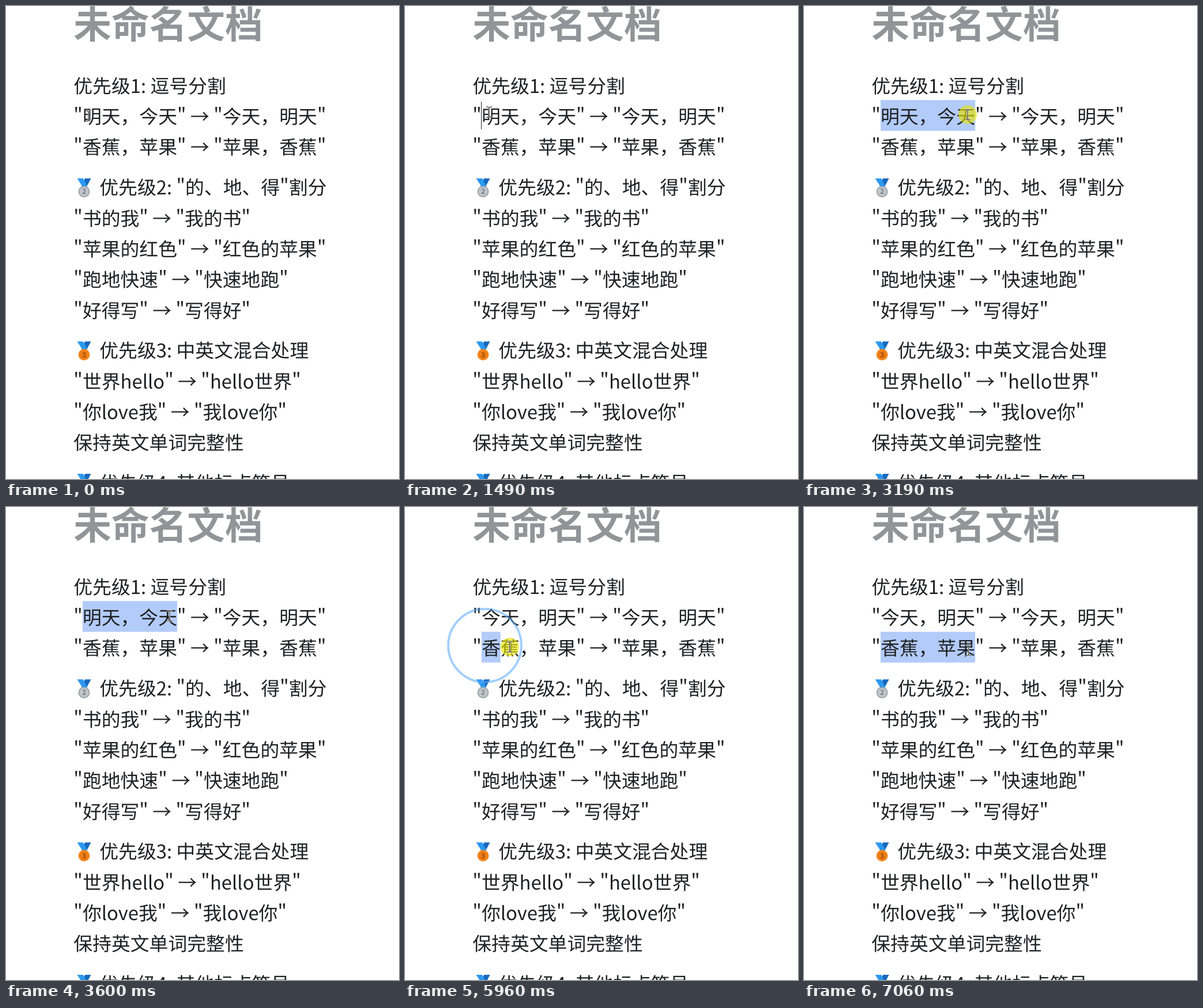
An HTML page that plays this animation: 682 by 821 pixels, repeating every 8000 ms.

```html
<!DOCTYPE html>
<html lang="zh-CN">
<head>
<meta charset="utf-8">
<style>
  html, body { margin: 0; width: 100%; height: 100%; overflow: hidden; background: #fff; }
  svg { display: block; }
  text {
    font: 32.85px "Noto Sans CJK SC", "Noto Sans CJK", "Noto Sans CJK JP", sans-serif;
    fill: #1f2022; white-space: pre; text-rendering: geometricPrecision;
  }
  .title { font-size: 65.7px; font-weight: 700; fill: #929498; }
  .digit { font-size: 12px; font-weight: 700; text-anchor: middle; }
</style>
</head>
<body>
<svg width="682" height="821" viewBox="0 0 682 821">
  <rect id="selection" height="53.4" fill="#b2cbf9"/>
  <text class="title" x="117.3" y="56">未命名文档</text>
  <g id="doc"></g>
  <rect id="caret" width="1" height="48" fill="#1f2022"/>
  <circle id="ring" fill="none" stroke="#58aafa" stroke-width="4"/>
  <g id="pointer" fill="none">
    <circle id="dot" r="16" fill="#e8e400" fill-opacity=".64"/>
    <path id="beam" d="M-5 -9h3l2 2l2 -2h3M0 -7V7M-5 9h3l2 -2l2 2h3"/>
    <use href="#beam" stroke="#fff" stroke-width="3" stroke-opacity=".7"/>
    <use href="#beam" stroke="#333" stroke-width="1.2"/>
  </g>
</svg>
<script>
const LOOP = 8000, STEP = 70, BLINK = 508, SWAP = 4730;
const LEFT = 117.3, EM = 32.85, ROW = 53.35, GAP = 16.4, FIRST_BASELINE = 150.7;
const TEXT_LEFT = LEFT + 0.474 * EM; // after the opening quote
const SELECTED_MAX = 5;

const $ = id => document.getElementById(id);
const set = (el, attrs) => { for (const k in attrs) el.setAttribute(k, attrs[k]); };
const show = (el, on) => set(el, { visibility: on ? 'visible' : 'hidden' });
const clamp = (v, lo, hi) => Math.min(hi, Math.max(lo, v));

const groups = [
  ['优先级1: 逗号分割', '"明天，今天" → "今天，明天"', '"香蕉，苹果" → "苹果，香蕉"'],
  ['优先级2: "的、地、得"割分', '"书的我" → "我的书"', '"苹果的红色" → "红色的苹果"', '"跑地快速" → "快速地跑"', '"好得写" → "写得好"'],
  ['优先级3: 中英文混合处理', '"世界hello" → "hello世界"', '"你love我" → "我love你"', '保持英文单词完整性'],
  ['优先级4: 其他标点符号']
];
const silver = { rim: '#9ea7ad', face: '#c0c6ca', ink: '#737c82' };
const bronze = { rim: '#f58a1e', face: '#ee7d16', ink: '#a04c08' };

const medal = (digit, y, { rim, face, ink }) => `<g transform="translate(123 ${y})">
  <path d="M14 0H24.5L17 14H8Z" fill="#1769bd"/>
  <path d="M.5 0H11L18.5 14H9.5Z" fill="#2b98f0"/>
  <circle cx="12.5" cy="23" r="9" fill="${face}" stroke="${rim}" stroke-width="2"/>
  <text class="digit" x="12.5" y="27.3" style="fill:${ink}">${digit}</text></g>`;

let baseline = FIRST_BASELINE, markup = '';
groups.forEach((lines, g) => {
  lines.forEach((line, i) => {
    const headed = g > 0 && i === 0;
    if (headed) markup += medal(g + 1, baseline - 28, g === 2 ? bronze : silver);
    markup += `<text class="line" x="${LEFT + (headed ? 45 : 0)}" y="${baseline}">${line}</text>`;
    baseline += ROW;
  });
  baseline += GAP;
});
$('doc').innerHTML = markup;
const swapLine = document.querySelectorAll('.line')[1];

const smooth = p => p * p * (3 - 2 * p);
const easeOut = n => p => 1 - (1 - p) ** n;

// Pointer moves: each starts where the last one ended; "via" bends the path.
const home = [143, 191];
const moves = [
  { start: 1130, end: 1490, to: [146, 184], ease: smooth },
  { start: 1890, end: 2980, to: [284, 188.5], ease: smooth },
  { start: 4990, end: 5810, to: [138.5, 240.5], ease: smooth, via: [30, 310] },
  { start: 5880, end: 6520, to: [285.5, 249], ease: easeOut(3) }
];
const drags = [
  { press: 1890, release: 3530, end: SWAP, row: 1 },
  { press: 5880, release: 6850, end: LOOP, row: 2 }
];

function pointerAt(t) {
  let at = home;
  for (const { start, end, to, ease, via } of moves) {
    if (t < start) break;
    const p = ease(clamp((t - start) / (end - start), 0, 1)), q = 1 - p;
    at = at.map((from, i) => via
      ? q * q * from + 2 * p * q * via[i] + p * p * to[i]
      : q * from + p * to[i]);
  }
  return at;
}

const rowTop = row => FIRST_BASELINE + row * ROW - 40.8;

function draw(time) {
  const t = Math.floor(time / STEP + 0.2) * STEP; // motion is held between screen updates
  const drag = drags.find(d => t >= d.press && time < d.end);
  const swapped = time >= SWAP;

  swapLine.textContent = `"${swapped ? '今天，明天' : '明天，今天'}" → "今天，明天"`;
  set($('pointer'), { transform: `translate(${pointerAt(t)})` });
  show($('dot'), drag && t < drag.release);

  let selected = 0, ringPhase = 1;
  if (drag) {
    const laggedX = pointerAt(t - STEP / 2)[0];
    selected = clamp(Math.round((laggedX - TEXT_LEFT) / EM), 0, SELECTED_MAX);
    set($('selection'), { x: TEXT_LEFT, y: rowTop(drag.row), width: selected * EM });

    ringPhase = (t - drag.press + 23) / 210;
    const [cx, cy] = pointerAt(drag.press);
    set($('ring'), { cx, cy, r: 92 * easeOut(2)(Math.min(1, ringPhase)), opacity: Math.max(0, 1 - ringPhase) });
  }
  show($('selection'), selected);
  show($('ring'), ringPhase < 1);

  const blinkStart = swapped ? SWAP : 470;
  const blinkOn = time >= blinkStart && Math.floor((time - blinkStart) / BLINK) % 2 === 0;
  show($('caret'), drag ? !selected : blinkOn);
  set($('caret'), {
    x: Math.floor(TEXT_LEFT + (swapped && !drag ? SELECTED_MAX * EM : 0)),
    y: Math.round(rowTop(drag ? drag.row : 1) + 2.7)
  });
}

function tick() {
  draw(performance.now() % LOOP);
  requestAnimationFrame(tick);
}
tick();
</script>
</body>
</html>
```
